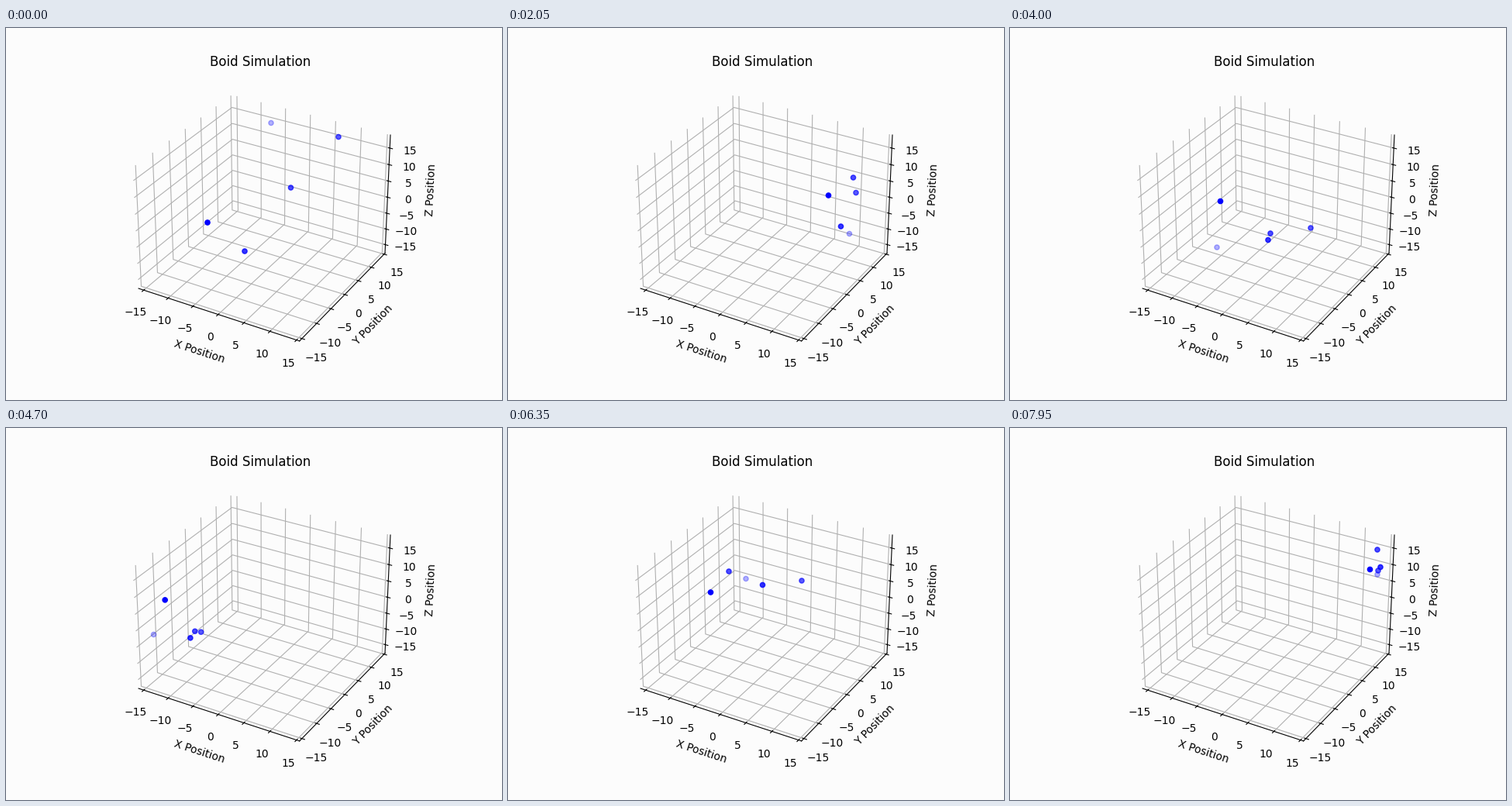
Write a matplotlib script that moves like this. It is 640 px wide and 480 px high and loops after 8000 ms.

```python
import numpy as np
import matplotlib.pyplot as plt
from matplotlib.animation import FuncAnimation

W, H, DPI = 640, 480, 100
FRAMES, INTERVAL = 160, 50
PAPER = "#fcfcfc"
LEFT, RIGHT = 172, 488      # walls the flock bounces between, in pixels
SPAN = RIGHT - LEFT

# A few points each boid flies through, and how many walls it has hit by then.
KEYS = np.array([0, 18, 41, 80, 108, 127, 159])
HITS = np.array([0, 0, 0, 1, 2, 2, 2])
POINTS = np.array([
    [(260, 251), (352.5, 195.5), (413.5, 216), (271.5, 223.5), (193, 218.5), (261.5, 212), (464.5, 182.5)],
    [(308, 288), (313, 235.5), (429.5, 256), (333, 273.5), (204, 256), (328.5, 202.5), (478, 179.5)],
    [(429, 140.5), (375.5, 205), (449, 212.5), (388, 258), (237, 253), (379, 197), (475, 184)],
    [(367.5, 206), (391, 175.5), (445.5, 193), (336, 265), (190.5, 242.5), (285, 185), (474, 157)],
    [(342, 122.5), (365, 227.5), (440.5, 265.5), (267, 283), (222, 240.5), (307, 194.5), (474, 189)],
])
SHADES = [1, 0.8, 0.65, 0.7, 0.3]    # nearest to farthest boid


def unfold(x):
    """Distance flown across, as if the walls were mirrors."""
    return HITS * SPAN + np.where(HITS % 2, LEFT + RIGHT - x, x)


def fold(u):
    """Bounce an unfolded distance back between the walls."""
    s = (u - LEFT) % (2 * SPAN)
    return LEFT + np.minimum(s, 2 * SPAN - s)


ACROSS = unfold(POINTS[:, :, 0])
DOWN = POINTS[:, :, 1]


def glide(v, t):
    """Smooth curve through the key values, one row per boid."""
    m = np.gradient(v, KEYS, axis=1)
    i = min(np.searchsorted(KEYS, t, side="right") - 1, len(KEYS) - 2)
    h = KEYS[i + 1] - KEYS[i]
    u = (t - KEYS[i]) / h
    ease = u * u * (3 - 2 * u)
    return (v[:, i] * (1 - ease) + v[:, i + 1] * ease
            + h * u * (1 - u) * ((1 - u) * m[:, i] - u * m[:, i + 1]))


fig = plt.figure(figsize=(W / DPI, H / DPI), dpi=DPI, facecolor=PAPER)
ax = fig.add_subplot(projection="3d", facecolor=PAPER)
ax.set_title("Boid Simulation")
ax.set(xlabel="X Position", ylabel="Y Position", zlabel="Z Position")
ax.set(xlim=(-16.06, 15.56), ylim=(-15.8, 15.36), zlim=(-17.78, 18.9))
for axis in (ax.xaxis, ax.yaxis, ax.zaxis):
    axis.set_ticks(range(-15, 16, 5))
    axis.set_pane_color((1, 1, 1, 0))
ax.yaxis.pane.set_edgecolor("#e8e8e8")
ax.yaxis.pane.set_linewidth(0.8)

# Flat layer in pixel units for the boids, farthest drawn first.
layer = fig.add_axes([0, 0, 1, 1])
layer.set(xlim=(0, W), ylim=(H, 0))
layer.axis("off")
colors = [(0, 0, 1, a) for a in SHADES[::-1]]
dots = layer.scatter(np.zeros(5), np.zeros(5), s=20, c=colors)


def draw(t):
    spots = np.column_stack([fold(glide(ACROSS, t)), glide(DOWN, t)])
    dots.set_offsets(spots[::-1])
    return [dots]


anim = FuncAnimation(fig, draw, frames=FRAMES, interval=INTERVAL,
                     init_func=lambda: draw(0), repeat=True, cache_frame_data=False)
plt.show()
```
